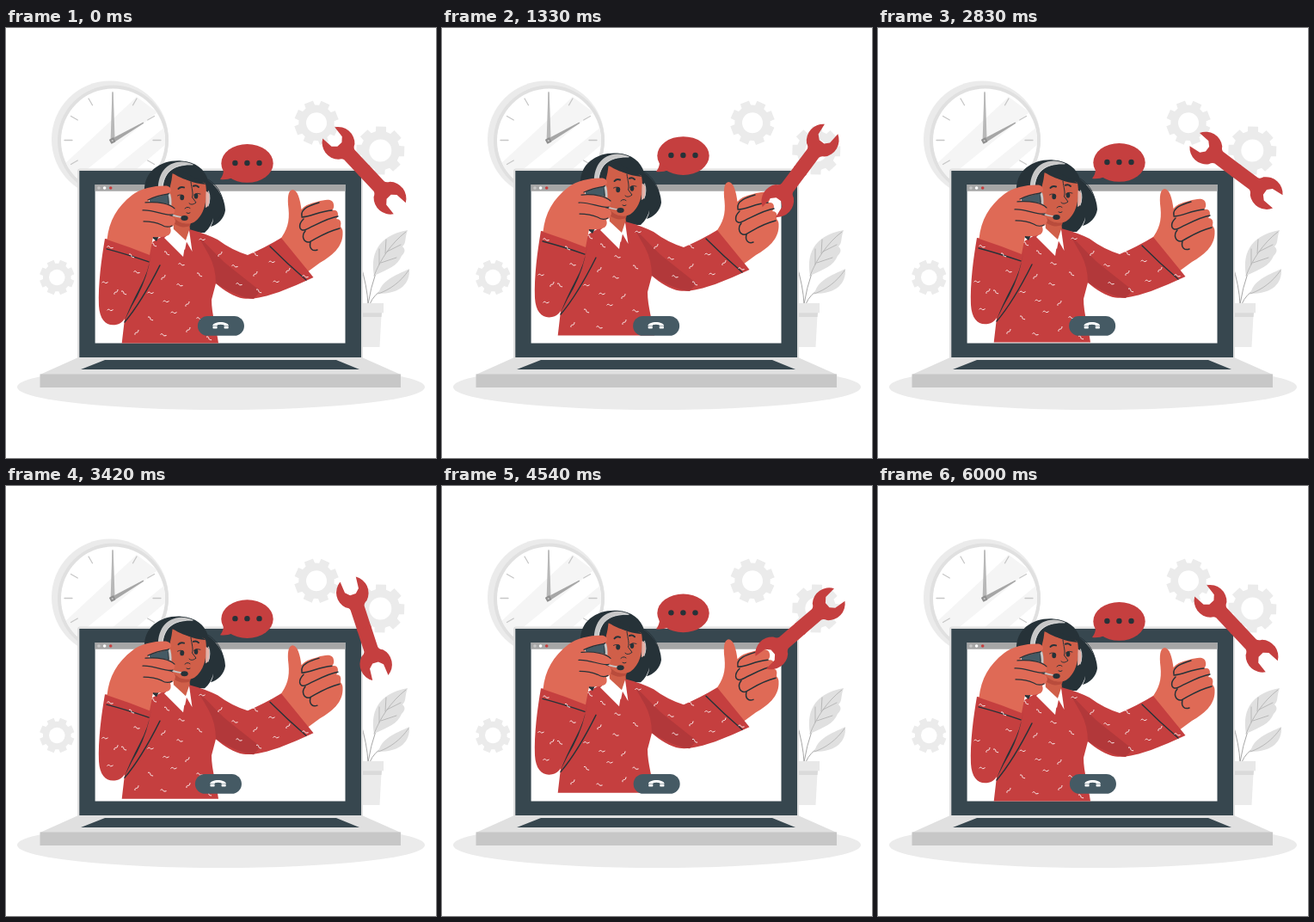
Write an HTML page with a canvas that moves like this. It is 500 px wide and 500 px high and loops after 6040 ms.

```html
<!DOCTYPE html>
<html lang="en">
<head>
<meta charset="utf-8">
<title>Video call support</title>
<style>
html, body { margin: 0; width: 100%; height: 100%; overflow: hidden; background: #fff; }
canvas { display: block; width: 500px; height: 500px; }
</style>
</head>
<body>
<canvas id="stage"></canvas>
<script>
const canvas = document.getElementById('stage');
const ratio = window.devicePixelRatio || 1;
canvas.width = canvas.height = 500 * ratio;
const c = canvas.getContext('2d');

const LOOP = 6040, STEP = 1000 / 24, LAST = 144;
const RED = '#c53f3f', SHADE = '#b2383a', SKIN = '#df6a56', FACE = '#d05f49';
const INK = '#263238', SLATE = '#37474f', STEEL = '#455a64';
const G1 = '#ebebeb', G2 = '#e0e0e0', G3 = '#c7c7c7', G4 = '#a6a6a6';

const cache = {};
const path = d => cache[d] || (cache[d] = new Path2D(d));

function fill(color, ...shapes) {
  c.fillStyle = color;
  for (const d of shapes) c.fill(path(d));
}
function line(color, width, ...shapes) {
  c.strokeStyle = color;
  c.lineWidth = width;
  for (const d of shapes) c.stroke(path(d));
}
function oval(color, x, y, rx, ry = rx) {
  c.fillStyle = color;
  c.beginPath();
  c.ellipse(x, y, rx, ry, 0, 0, 7);
  c.fill();
}
function box(color, x, y, w, h, r = 0) {
  c.fillStyle = color;
  c.beginPath();
  c.roundRect(x, y, w, h, r);
  c.fill();
}
function at(x, y, turn, draw) {
  c.save();
  c.translate(x, y);
  c.rotate(turn);
  draw();
  c.restore();
}

function gear(x, y, r, hole, turn) {
  at(x, y, turn, () => {
    c.fillStyle = G1;
    c.beginPath();
    const step = Math.PI / 4, inner = r * 0.8;
    for (let i = 0; i < 8; i++) {
      const a = i * step;
      for (const [da, rad] of [[-0.27, inner], [-0.21, r], [0.21, r], [0.27, inner]])
        c.lineTo(Math.cos(a + da) * rad, Math.sin(a + da) * rad);
    }
    c.closePath();
    c.moveTo(hole, 0);
    c.arc(0, 0, hole, 0, 7);
    c.fill('evenodd');
  });
}

function clock() {
  oval(G1, 121, 129.5, 68);
  oval(G2, 124.5, 131, 64.5);
  oval('#fff', 124.5, 131, 60.5);
  c.save();
  c.beginPath();
  c.arc(124.5, 131, 60.5, 0, 7);
  c.clip();
  fill('#f5f5f5', 'M66 160L152 80L176 98L80 176Z', 'M102 182L185 115L187 134L124 188Z');
  c.restore();
  for (let i = 0; i < 12; i++)
    at(124, 130.5, i * Math.PI / 6, () => line(G3, 1.3, 'M0 -56V-47'));
  fill('#b8b8b8', 'M121.6 131L123.4 75H124.8L126.6 131Z');
  fill(G4, 'M122.5 129L159.6 109.6L160.2 110.8L124.8 133.5Z');
  at(123.7, 131, -0.5, () => box('#8f8f8f', -2.9, -2.9, 5.8, 5.8, 0.8));
  oval(G3, 123.7, 131, 1.1);
}

function plant() {
  line(G4, 1, 'M421 321Q420 300 412 274', 'M421 321Q424 302 430 285', 'M423 321Q428 309 440 303');
  fill(G2, 'M428 288C424 265 430 242 467 235C463 246 466 249 461 254C464 257 465 260 460 265C455 277 445 280 428 288Z',
    'M433 309C437 293 452 288 469 280C470 297 459 309 433 309Z');
  line(G4, 0.7, 'M428 288C435 270 447 251 465 237', 'M434 275L434 257', 'M441 262L442 246', 'M436 273L454 267',
    'M443 260L459 252', 'M433 309C447 304 459 295 468 282');
  fill(G1, 'M399 325H437L434.5 371H402Z');
  fill('#dadada', 'M399 331H437L436.6 336H399Z');
  box('#e8e8e8', 397, 320, 42, 11.3);
}

function laptop() {
  box(G2, 83, 163.5, 332, 224, 3);
  box(SLATE, 85.3, 166, 327.7, 217);
  box('#fff', 103.6, 182, 290.9, 184.6);
  box(G4, 103.6, 182, 290.9, 7.8);
  oval(G3, 108, 186, 1.8);
  oval('#fff', 114.6, 186, 1.8);
  oval(RED, 121.7, 186, 1.8);
  fill(G2, 'M83 383.5H415L459 403H39.5Z');
  fill(SLATE, 'M115 386H384L411 397H87Z');
  box(G3, 39.5, 402.5, 419.5, 15.5);
}

function backdrop() {
  clock();
  gear(361, 110.3, 26, 12, 0.42);
  gear(435.3, 142.5, 28.5, 13, 0.03);
  gear(59.3, 290, 20.5, 9.3, 0.39);
  oval(G1, 250, 417.5, 237, 26.5);
  plant();
  laptop();
}

const SPOTS = [
  121, 255, 146, 265, 115, 296, 128, 307, 152, 284, 137, 308, 121, 328, 152, 354, 183, 357,
  168, 338, 195, 331, 212, 351, 225, 338, 236, 361, 186, 318, 211, 321, 202, 299, 225, 287,
  168, 308, 183, 290, 204, 275, 187, 262, 228, 246, 249, 263, 266, 277, 290, 263, 309, 272,
  290, 286, 271, 298, 294, 306, 314, 295, 328, 282, 348, 289, 172, 252
];

function head() {
  fill(INK, 'M161 190C160 166 181 153 204 154.5C221 156 231 164 235 177C245 184 255 198 255 212C254 221 246 229 238 231Q241 226 241 221Q239 231 231 238C214 238 192 233 184 218C178 210 171 201 161 190Z');
  line(INK, 0.9, 'M235 176C253 187 260 213 243 226');
  fill(FACE, 'M194 218L195 236L209 248L214 236L213 222Z');
  fill('#b94c3c', 'M195 220Q203 230 215 226L214 230Q204 234 195 227Z');
  fill(FACE, 'M193 169C199 171 202 175 213 177C221 178 228 178 232 181C235 198 231 216 221 224C213 231 202 227 195 220C188 211 189 190 193 169Z');
  fill(INK, 'M190 173Q193 164 203 164C211 171 222 174 233 182Q220 181 211 177Q200 171 194 166Q193 177 190 188Z');
  fill('#e6b1a7', 'M232.5 190Q237 190 237 199Q237 207 232 209Z');
  line(G3, 1.1, 'M235.5 190Q238.5 198 235 207');

  line(INK, 2, 'M200.5 187Q203 184 207 185.5', 'M218 183.8Q221 182.3 224 185');
  oval(INK, 204.7, 197, 2.4, 3.2);
  oval(INK, 221, 195.5, 2.3, 3.1);
  line(INK, 0.9, 'M199.5 195Q204 192.5 207 196', 'M218.5 194Q222 191 226 193');
  line(INK, 1, 'M215 179C216 187 218 192 216.5 197L221 203Q216 207 213 204', 'M208 210Q211 207 214 209.5', 'M210 215Q212 216.5 214 215');

  fill(G3, 'M177 193C175 170 186 156 204 155.5Q212 155.5 218 159Q211 158.5 204 160C189 163 181 174 182.5 193Z');
  line('#efefef', 0.8, 'M182 192C181 174 189 163 204 160Q211 158.5 217 159');
}

function jumper() {
  fill(RED, 'M187 239L165 252L115 245C111 268 107 298 108 323C109 340 117 347 128 345Q134 344 138 338L134.7 366.5H247C245 350 239 333 239 316L244 297C253 305 266 313 276 314.5C298 317 329 303 357.5 290L320 244Q302 255 281 264Q262 258 246 246Q232 239 213 234L208 258Z');
  fill(SHADE, 'M224 243C236 253 246 266 257 275L296 306L288 315Q272 314 244 297Q244 279 236 264Z');
  line(INK, 1.4, 'M117 257Q140 263 166 272', 'M307 254Q327 274 349 293', 'M179 276C168 298 155 322 138 342');
  fill(INK, 'M169 262Q166 283 155 303Q144 324 138 340L146 324Q161 299 166 277Z');
  for (let i = 0; i < SPOTS.length; i += 2) {
    const k = i / 2;
    at(SPOTS[i], SPOTS[i + 1], [0.35, 0.75, 0.1, -0.75][k % 4],
      () => line('#fff', 0.85, 'M-3.2 .4C-1.5 -2.4 0 .9 1 .6Q2 .4 3.2 -.5'));
  }
  fill('#fff', 'M184 244L195 234L209 247L206 266Z', 'M209 247L213 235L216.5 260Z');
}

function raisedHand() {
  fill(STEEL, 'M166 198Q178 191 188.5 193V208L170 211Z');
  line(G3, 2.8, 'M190 194Q192 202 190.5 212');
  line(G3, 1.6, 'M190 215Q194 219 204 220');
  oval(INK, 207.5, 221, 4.2, 3);
  fill(INK, 'M169 243L179 240L175 248Z');
  fill(SKIN, 'M117.5 246C120 224 129 208 147 194C157 186 174 183 187 183.5Q192.5 185 192 189.5C189 195 175 195 166 200L167 203C178 202 187 204 193 206.5Q198 210 195.5 215Q192 219 188 218Q196 218 197 224Q197 229 191 232Q193 238 189 241Q182 244 171 243L167 264Q142 254 117.5 246Z');
  line(INK, 1.2, 'M165 200Q175 195 189 193', 'M162 203Q173 202 183 204Q192 206 196 210', 'M159 212C172 211 185 219 194 217', 'M160 225Q172 225 181 229Q187 233 193 230');
}

function thumbsUp() {
  fill(SKIN, 'M318 247C327 235 330 225 328.5 210C327 197 328 189 333 188C339 188 342 199 343.5 211Q348 205 362 202C372 199 380 198 381 205Q382 209 379 212Q386 211 386 217Q386 220 384 222Q391 222 389 231Q392 234 391.5 240C391 255 379 265 365 273L350 284Z');
  line(INK, 1.5, 'M344 219C342 210 354 206 364 203', 'M344 220C354 220 364 213 379 212', 'M346 222C339 229 341 236 347 235C359 230 373 221 386 219',
    'M348 236C343 242 346 250 353 249C364 243 372 237 388 233', 'M354 249C352 257 357 260 362 258');
}

function woman() {
  head();
  thumbsUp();
  jumper();
  raisedHand();
}

function bubble() {
  oval(RED, 280.5, 157.5, 30.2, 22.4);
  fill(RED, 'M253 165Q253 171 249 176Q256 177 264 174Z');
  for (const x of [266.4, 280.4, 294.5]) oval(INK, x, 157, 3.2);
}

function button() {
  box(STEEL, 223, 335, 54, 22.8, 11.4);
  fill('#fff', 'M240.3 346.5C240.5 340.5 258.8 340.5 259 346.5H253.6V345.2Q249.6 344.2 245.8 345.2V346.5Z');
  box('#fff', 240.5, 347, 5.2, 2.6, 0.8);
  box('#fff', 253.6, 347, 5.2, 2.6, 0.8);
}

function wrenchHalf() {
  // Round jaw with a six-sided slot, joined to the handle.
  fill(RED, 'M-1 -8.4H25Q28 -8.8 30 -13A19.5 19.5 0 0 1 60.3 -9.6L46.5 -8.4L41.8 -3.5V3.5L46.5 8.4L60.3 9.6A19.5 19.5 0 0 1 30 13Q28 8.8 25 8.4H-1Z');
}

function wrench(angle) {
  at(416.5, 165.8, angle, () => {
    wrenchHalf();
    c.rotate(Math.PI);
    wrenchHalf();
  });
}

const SHAKE = [0, -1, 2, -4, 4, -4, 4, -4, 2, -1, 0];
function shake(t) {
  const p = (t % 1500) / 150, i = Math.floor(p);
  return SHAKE[i] + (SHAKE[i + 1] - SHAKE[i]) * (p - i);
}
const lift = t => -10 * (1 - Math.abs(1 - (t % 3000) / 1500));

function draw(now) {
  const frame = Math.min(LAST, Math.floor((now % LOOP + 5) / STEP));
  const t = frame * STEP + 10;
  c.setTransform(ratio, 0, 0, ratio, 0, 0);
  c.lineCap = c.lineJoin = 'round';
  c.fillStyle = '#fff';
  c.fillRect(0, 0, 500, 500);
  backdrop();
  c.save();
  c.translate(0, lift(t));
  woman();
  bubble();
  c.restore();
  c.save();
  c.translate(shake(t), 0);
  button();
  c.restore();
  wrench((46.2 + t * 0.06) * Math.PI / 180);
}

const start = performance.now();
function tick() {
  draw(performance.now() - start);
  requestAnimationFrame(tick);
}
tick();
</script>
</body>
</html>
```
